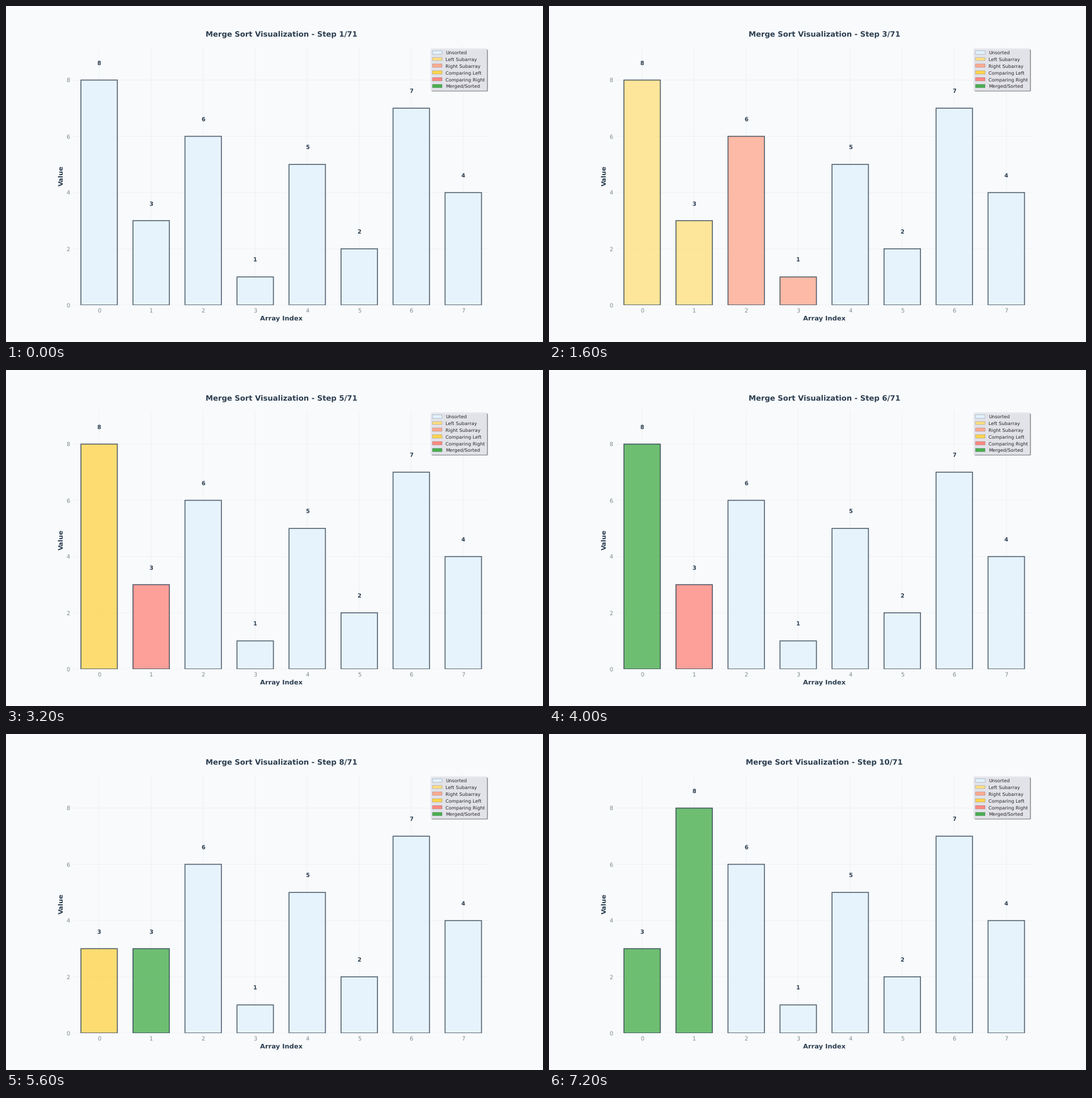
A matplotlib script that plays this animation: 947x592 px, repeating every 8 s.

```python
from itertools import islice

import matplotlib.pyplot as plt
from matplotlib.animation import FuncAnimation
from matplotlib.patches import Patch

DPI = 947 / 16
VALUES = [8, 3, 6, 1, 5, 2, 7, 4]
SHOWN = 10
STEP_MS = 800

PAPER = "#F8FAFC"
INK = "#2C3E50"
COLORS = {
    "Unsorted": "#E3F2FD",
    "Left Subarray": "#FFE082",
    "Right Subarray": "#FFAB91",
    "Comparing Left": "#FFD54F",
    "Comparing Right": "#FF8A80",
    "Merged/Sorted": "#4CAF50",
}


def snapshot(arr, **groups):
    """Copy the values and give each bar a role; later groups win."""
    names = {
        "left": "Left Subarray",
        "right": "Right Subarray",
        "cmp_left": "Comparing Left",
        "cmp_right": "Comparing Right",
        "merged": "Merged/Sorted",
    }
    roles = ["Unsorted"] * len(arr)
    for key, indices in groups.items():
        for i in indices:
            roles[i] = names[key]
    return list(arr), roles


def merge(arr, lo, mid, hi):
    left, right = arr[lo:mid], arr[mid:hi]
    yield snapshot(arr, cmp_left=range(lo, mid), cmp_right=range(mid, hi))
    i = j = 0
    for k in range(lo, hi):
        active = {}
        if i < len(left):
            active["cmp_left"] = [lo + i]
        if j < len(right):
            active["cmp_right"] = [mid + j]
        yield snapshot(arr, **active, merged=[k])
        if j == len(right) or (i < len(left) and left[i] <= right[j]):
            arr[k] = left[i]
            i += 1
        else:
            arr[k] = right[j]
            j += 1
        yield snapshot(arr, merged=range(lo, k + 1))
    yield snapshot(arr, merged=range(lo, hi))


def merge_sort(arr, lo, hi):
    if hi - lo < 2:
        return
    mid = (lo + hi) // 2
    yield snapshot(arr, left=range(lo, mid), right=range(mid, hi))
    yield from merge_sort(arr, lo, mid)
    yield from merge_sort(arr, mid, hi)
    yield from merge(arr, lo, mid, hi)


def all_steps():
    arr = list(VALUES)
    yield snapshot(arr)
    yield from merge_sort(arr, 0, len(arr))
    yield snapshot(arr, merged=range(len(arr)))


plt.rcParams.update({
    "font.family": "DejaVu Sans",
    "text.hinting": "none",
    "text.color": "0.15",
    "axes.axisbelow": True,
    "axes.linewidth": 0,
    "patch.linewidth": 0.3,
})

total = len(list(all_steps()))
steps = list(islice(all_steps(), SHOWN))

fig, ax = plt.subplots(figsize=(947 / DPI, 592 / DPI), dpi=DPI, facecolor=PAPER)
ax.set_facecolor(PAPER)
for spine in ax.spines.values():
    spine.set_visible(False)

bars = ax.bar(range(len(VALUES)), VALUES, width=0.7, alpha=0.8,
              edgecolor=INK, linewidth=2, snap=False)
labels = [ax.text(i, 0, "", ha="center", va="bottom", fontsize=12,
                  fontweight="bold", color=INK) for i in range(len(VALUES))]

ax.set_xlim(-0.5, len(VALUES) - 0.5)
ax.set_ylim(0, max(VALUES) * 1.15)
ax.set_xticks(range(len(VALUES)))
ax.set_yticks(range(0, 9, 2))
ax.tick_params(length=0, pad=7, labelsize=12, labelcolor="#7F8C8D")
ax.grid(True, color="#E0E0E0", alpha=0.4, linewidth=1, snap=False)
ax.set_xlabel("Array Index", fontsize=14, fontweight="bold", color=INK)
ax.set_ylabel("Value", fontsize=14, fontweight="bold", color=INK)
title = ax.set_title("", fontsize=16, fontweight="bold", color=INK, pad=20)

ax.legend(handles=[Patch(facecolor=c, edgecolor=INK, label=name)
                   for name, c in COLORS.items()],
          loc="upper right", fontsize=10, frameon=True, fancybox=True,
          shadow=True, framealpha=0.9, facecolor="#EAEAF2")


def draw(n):
    values, roles = steps[n]
    for bar, label, value, role in zip(bars, labels, values, roles):
        bar.set_height(value)
        bar.set_facecolor(COLORS[role])
        label.set_y(value + 0.5)
        label.set_text(str(value))
    title.set_text(f"Merge Sort Visualization - Step {n + 1}/{total}")
    return [*bars, *labels, title]


anim = FuncAnimation(fig, draw, frames=SHOWN, init_func=lambda: draw(0),
                     interval=STEP_MS, repeat=True, repeat_delay=0, blit=False)
plt.show()
```
